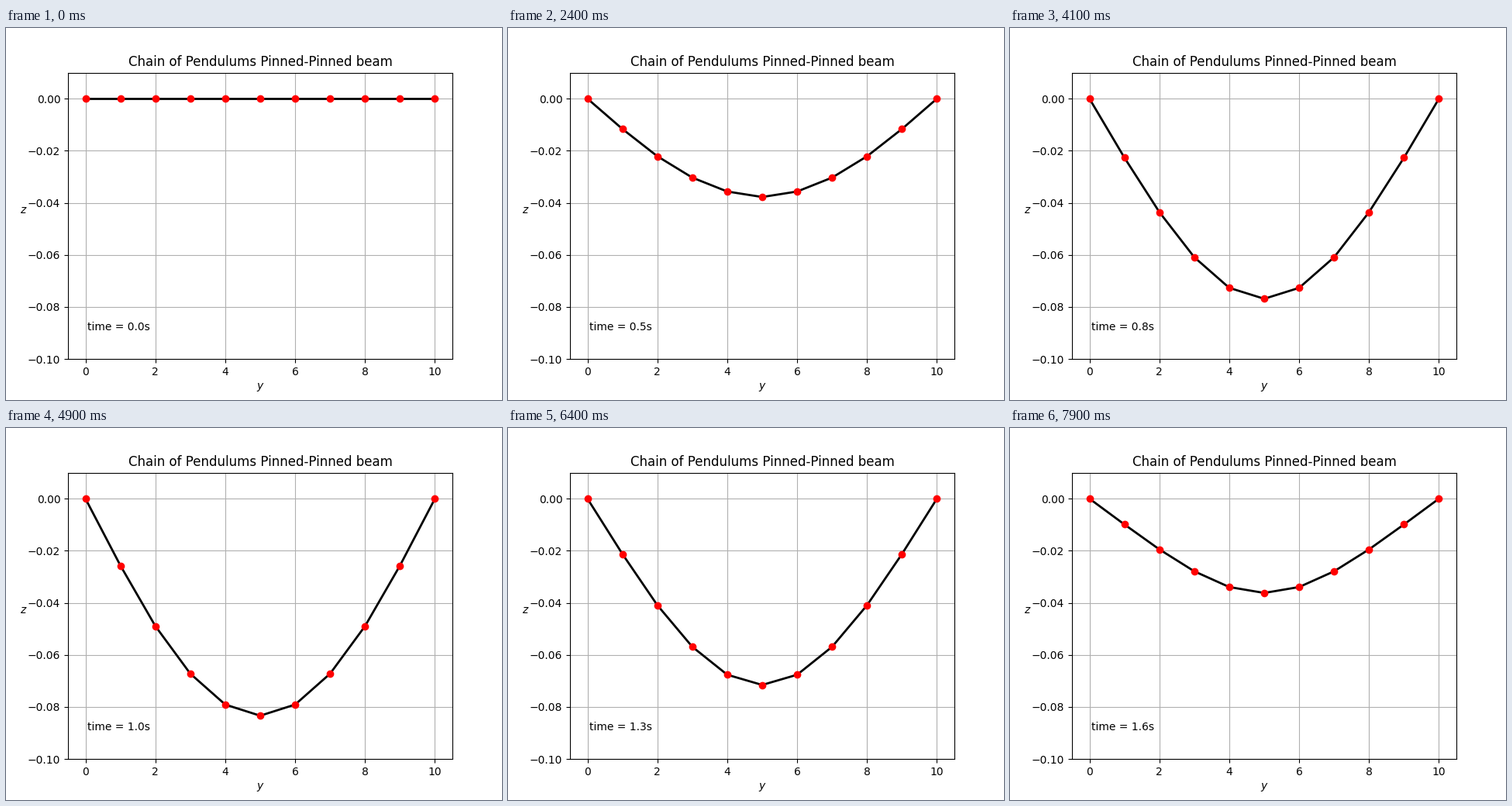
Write a matplotlib script that moves like this. It is 640 by 480 pixels and loops after 8000 ms.

```python
import numpy as np
import matplotlib.pyplot as plt
from matplotlib.animation import FuncAnimation

LINKS = 10        # unit links between the two pins
STIFFNESS = 1000  # joint spring over mass
FORCE = 2         # constant push on the middle joint
LAG = 0.005       # onset delay of the push, s
DT = 0.02         # simulated time per frame, s
FRAMES = 80

y = np.arange(LINKS + 1)
mode = np.arange(1, LINKS, 2)
shape = np.sin(np.pi * np.outer(y, mode) / LINKS)
omega = 2 * np.sqrt(STIFFNESS) * (1 - np.cos(np.pi * mode / LINKS))
static = 2 / LINKS * FORCE * shape[LINKS // 2] / omega**2


def deflection(t):
    """Height of every joint, summed over the vibration modes."""
    t = max(t - LAG, 0)
    return -shape @ (static * (1 - np.cos(omega * t)))


plt.rcParams["font.family"] = "DejaVu Sans"
fig, ax = plt.subplots(figsize=(6.4, 4.8), dpi=100)
ax.set_title("Chain of Pendulums Pinned-Pinned beam")
ax.set_xlabel("$y$")
ax.set_ylabel("$z$", rotation=0)
ax.set_xlim(-0.5, 10.5)
ax.set_ylim(-0.1, 0.01)
ax.grid()

chain, = ax.plot([], [], "o-", color="black", lw=2, markersize=6,
                 markerfacecolor="red", markeredgecolor="red")
clock = ax.text(0.05, 0.1, "", transform=ax.transAxes)


def update(frame):
    t = frame * DT
    chain.set_data(y, deflection(t))
    clock.set_text(f"time = {t:.1f}s")
    return chain, clock


anim = FuncAnimation(fig, update, frames=FRAMES, interval=100,
                     repeat=True, repeat_delay=0)
plt.show()
```
